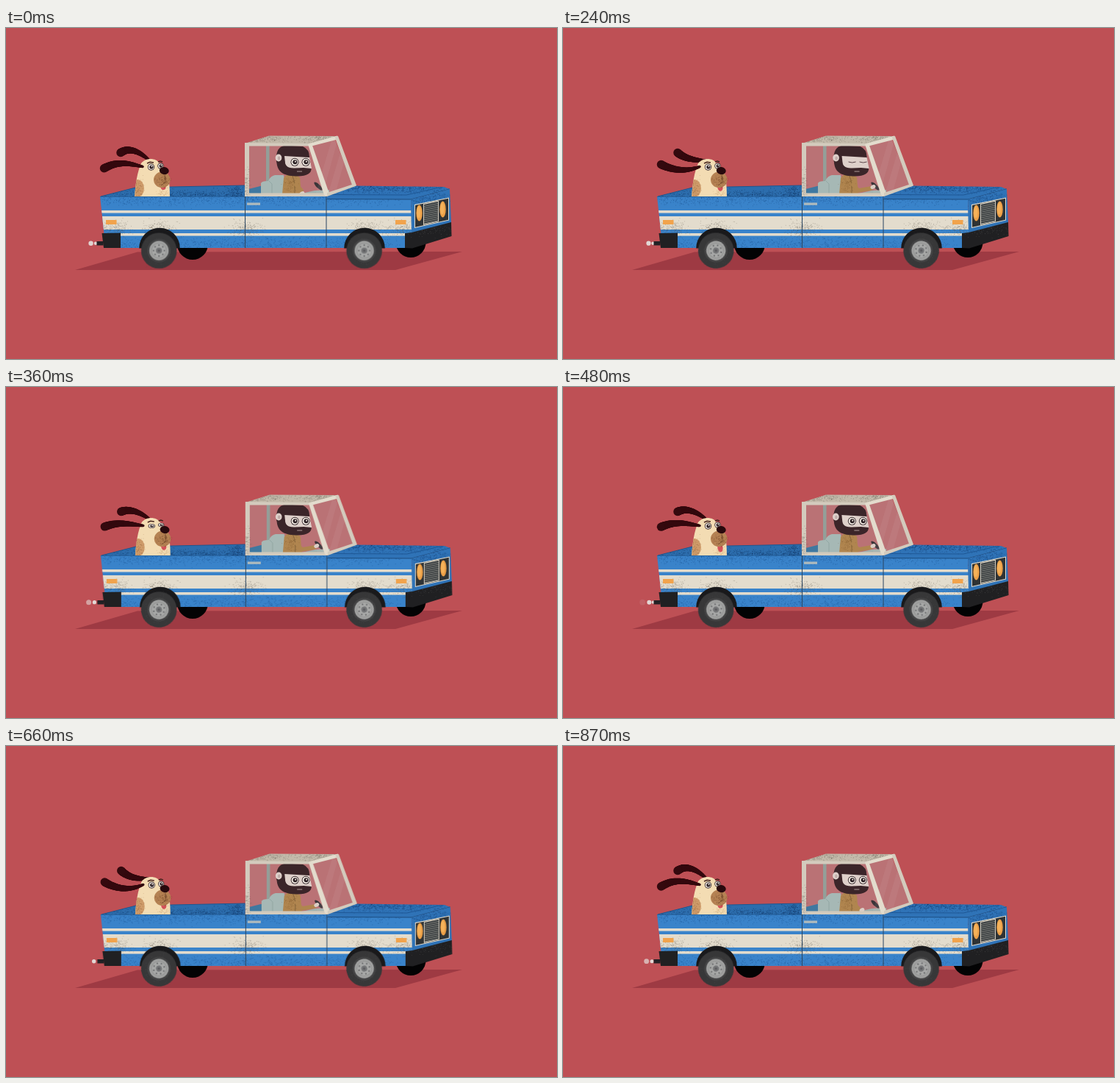
These frames come from a looping animation (750 by 450 pixels, 900 ms). An HTML page with a canvas:

```html
<!DOCTYPE html>
<html>
<head>
<meta charset="utf-8">
<title>Pickup ride</title>
<style>
html, body { margin: 0; width: 750px; height: 450px; overflow: hidden; background: #be5055; }
canvas { display: block; }
</style>
</head>
<body>
<canvas id="stage" width="750" height="450"></canvas>
<script>
const LOOP = 900, STEP = 30, TAU = Math.PI * 2;
const RED = '#be5055', BLUE = '#3983ca', CREAM = '#e3dccd', FRAME = '#d3cbbd', BLACK = '#202022', EAR = '#34090e', HAIR = '#3b2529';
const BLUE_GRAIN = 'rgba(16,58,112,.3)', DIRT = 'rgba(90,82,75,.33)';
const stage = document.getElementById('stage').getContext('2d');
let g = stage;

let seed = 7;
const random = () => (seed = seed * 16807 % 2147483647) / 2147483647;
const bell = () => random() + random() + random() - 1.5;

function trace(points) {
  g.beginPath();
  points.forEach(([x, y]) => g.lineTo(x, y));
}
function poly(color, ...points) {
  trace(points);
  g.fillStyle = color;
  g.fill();
}
function line(color, width, ...points) {
  trace(points);
  g.strokeStyle = color;
  g.lineWidth = width;
  g.stroke();
}
function rect(color, x, y, w, h) {
  g.fillStyle = color;
  g.fillRect(x, y, w, h);
}
function oval(color, x, y, rx, ry = rx, turn = 0) {
  g.beginPath();
  g.ellipse(x, y, rx, ry, turn, 0, TAU);
  g.fillStyle = color;
  g.fill();
}
function blob(color, d) {
  g.fillStyle = color;
  g.fill(new Path2D(d));
}
// Soft cloud of grain around a point.
function spray(color, x, y, sx, sy, count) {
  g.fillStyle = color;
  for (let i = 0; i < count; i++) g.fillRect(x + bell() * sx, y + bell() * sy, .9, .9);
}
function clipped(path, draw) {
  g.save();
  g.clip(path);
  draw();
  g.restore();
}
// Filled polygon whose details stay inside its outline.
function panel(color, points, details) {
  poly(color, ...points);
  clipped(new Path2D('M' + points.join('L') + 'Z'), details);
}
function layer(draw) {
  const c = document.createElement('canvas');
  c.width = 750;
  c.height = 450;
  g = c.getContext('2d');
  draw();
  g = stage;
  return c;
}

const cabin = new Path2D('M330 160L414 159L448 152L472 213L437 225L330 225Z');
const dogShape = new Path2D('M175 232C176 211 179 195 184 184C190 176 204 176 209 184L219 195Q223 205 223 232Z');

const backLayer = layer(() => {
  panel('#2c6dad', [[129, 229], [176, 217], [325, 214], [325, 231], [129, 231]], () => {
    spray('rgba(10,35,75,.35)', 230, 229, 130, 9, 1300);
    spray('rgba(10,35,75,.35)', 315, 223, 18, 14, 250);
  });
  line('#1d5690', 1, [129, 229], [176, 217], [325, 214]);
  g.fillStyle = 'rgba(176,187,188,.32)';
  g.fill(cabin);
  poly('#3f78a0', [330, 219], [350, 214], [350, 226], [330, 226]);
  rect('#939f99', 354, 159, 4.5, 52);
  blob('#a6b8b5', 'M347 226V211Q348 208 357 208Q360 201 366 200L378 200L382 226Z');
  line('#8da3a0', .8, [358, 208], [362, 212], [362, 226]);
  poly('#a3b2ae', [398, 226], [420, 221], [440, 220], [440, 226]);
});

function side() {
  panel(BLUE, [[128, 229], [436, 229], [551, 233], [553, 280], [545, 299], [135, 299], [133, 275]], () => {
    for (let x = 150; x < 550; x += 50) {
      spray(BLUE_GRAIN, x, 231, 45, 10, 190);
      spray(BLUE_GRAIN, x, 294, 40, 10, 130);
    }
    rect(CREAM, 120, 248, 440, 3.6);
    rect(CREAM, 120, 256, 440, 18);
    rect(CREAM, 120, 279, 440, 3.6);
    for (const x of [148, 209, 326, 488, 540]) spray(DIRT, x, 273, 22, 11, 240);
  });
  line('#2866a4', 1, [128, 229.5], [325, 229.5]);
  for (const x of [325.5, 436]) line('#2a4560', 1, [x, 229], [x, 299]);
  rect('#aebabd', 328, 237.5, 18, 3.3);
  for (const x of [136, 530]) rect('#f1a34c', x, 261, 14.5, 6);
}

function front() {
  panel('#2f73b7', [[437, 227], [474, 214.5], [596, 216], [604, 219], [551, 233], [436, 232]], () => {
    spray('rgba(10,40,85,.33)', 520, 217, 90, 8, 900);
    line('#1f5896', 1, [440, 226.5], [545, 227], [594, 216]);
  });
  line('#1b4d80', 1.1, [436, 232.5], [551, 233], [604, 219]);
  panel('#2f73b7', [[551, 233], [604, 219], [606, 265], [552, 279]], () =>
    spray('rgba(10,40,85,.33)', 577, 232, 35, 10, 300));
  poly(CREAM, [556, 240], [603, 230.5], [603, 261.5], [556, 272]);
  poly('#2f3335', [557, 241], [602, 231.8], [602, 260.7], [557, 270.7]);
  poly('#d5cec0', [568, 239], [589, 234.6], [589, 263.3], [568, 268]);
  poly('#3a3e40', [569, 240], [588, 236], [588, 262.4], [569, 266.6]);
  for (let y = 242.5; y < 266; y += 2.6) line('#989a93', .7, [569, y], [588, y - 4]);
  for (const [x, y] of [[562.5, 251.5], [594.5, 246.5]]) {
    oval('#eda047', x, y, 4.2, 11);
    oval('#f4b25b', x - .6, y - 1, 2.4, 8);
  }
  panel(BLACK, [[543, 279], [552, 278], [606, 264], [606.5, 283], [553, 299.5], [543, 299]], () =>
    spray('rgba(90,90,90,.4)', 575, 275, 40, 8, 120));
}

function cab() {
  clipped(cabin, () => {
    for (const x of [430, 447])
      poly('rgba(235,220,220,.07)', [x + 14, 150], [x + 22, 150], [x, 230], [x - 10, 230]);
  });
  panel('#c3baaa', [[325, 157], [358, 146.5], [451, 147], [413, 158]], () => {
    for (const x of [345, 430]) spray('rgba(85,80,68,.32)', x, 150, 40, 8, 300);
  });
  poly(FRAME, [325, 156], [413, 157], [415, 160.5], [331, 160.5], [331, 224.5], [436, 224.5], [436, 229], [325, 229]);
  spray(DIRT, 328, 215, 4, 22, 80);
  poly(CREAM, [411, 158], [416, 157], [440, 225], [437, 229], [433, 227]);
  poly(CREAM, [413, 157], [451, 146.5], [453, 151], [416, 160.5]);
  poly(FRAME, [447.5, 148], [452, 147], [477, 214], [472, 216]);
  poly(FRAME, [437, 224], [472, 212.5], [477, 214.5], [437, 229]);
}

const frontLayer = layer(() => {
  side();
  front();
  for (const x of [209, 488]) {
    g.beginPath();
    g.arc(x, 299.5, 27.8, Math.PI, TAU);
    g.fillStyle = '#19191b';
    g.fill();
  }
  poly(BLACK, [130.5, 279], [156, 278.5], [156, 299], [133, 299]);
  rect('#222125', 123.5, 290, 9, 5.5);
  cab();
});

const wheelLayer = layer(() => {
  g.translate(40, 40);
  oval('#373738', 0, 0, 24.3);
  spray('rgba(95,95,95,.3)', 0, 0, 18, 18, 200);
  oval('#434344', 0, 0, 16);
  oval('#a0a1a0', 0, 0, 13.2);
  oval('#929392', 0, 0, 10.6);
  oval('#a6a7a6', 0, 0, 9.7);
  for (let a = 0; a < TAU; a += TAU / 8) oval('#68696b', 7.4 * Math.cos(a), 7.4 * Math.sin(a), 1.1);
  oval('#747577', 0, 0, 4.1);
  oval('#59595c', 0, 0, 1.6);
});

function wheel(x, y, t) {
  g.save();
  g.translate(x, y);
  g.rotate(t / LOOP * TAU * 3);
  g.drawImage(wheelLayer, -40, -40);
  g.restore();
}

// Tapered cubic curve, thin at the root and thick at the tip.
function ear(a, b, c, d) {
  for (let i = 0; i <= 60; i++) {
    const u = i / 60, v = 1 - u;
    const at = n => v ** 3 * a[n] + 3 * v * v * u * b[n] + 3 * v * u * u * c[n] + u ** 3 * d[n];
    oval(EAR, at(0), at(1), 1.7 + 4 * u);
  }
}

function eye(x, y, r, open = 1) {
  oval('#33262a', x, y, r, r * open);
  oval('#f4ece4', x, y, r - .9, (r - .9) * open);
  oval('#2b2024', x + .4, y, r * .55, r * .55 * open);
  oval('#e9dfd8', x + .9, y - .7, r * .2);
}

function dog(t) {
  const swing = Math.cos((t + 25) / 450 * TAU);
  ear([196, 181], [185, 175 - 5 * swing], [169, 171 - 11 * swing], [156, 169.5]);
  g.fillStyle = '#f3dcb3';
  g.fill(dogShape);
  clipped(dogShape, () => {
    oval('#cf9c6a', 179, 218, 9, 12);
    spray('rgba(128,78,42,.25)', 179, 218, 9, 14, 130);
    spray('rgba(183,140,85,.3)', 214, 225, 10, 8, 80);
  });
  ear([186, 188.5], [174, 190 - 4 * swing], [155, 188 - 10 * swing], [133.5, 188 + 3 * swing]);

  const pant = .5 - .5 * Math.cos(t / 300 * TAU);
  oval('#d6545b', 214, 216 + 3 * pant, 3.6, 4 + 2 * pant, -.15);
  oval('#b58253', 212.3, 206.3, 11.3, 10.8);
  spray('rgba(85,45,25,.3)', 214, 207, 9, 9, 110);
  line('#70472d', .8, [216, 199], [217, 210], [211, 214]);
  const open = t >= 330 && t <= 390 ? .65 : 1;
  eye(197.5, 189, 4.7, open);
  eye(210.5, 187.5, 4.2, open);
  line('#43211c', 1.4, [192, 184], [196, 182.3], [201, 183]);
  line('#43211c', 1.4, [207, 182], [210, 181], [213, 182]);
  oval('#28090d', 215.3, 194, 6.5, 5, .15);
}

function driver(t) {
  const lift = Math.min(1, 2 * Math.sin(t / LOOP * Math.PI));
  const handX = 403 + 19 * lift, handY = 225 - 9 * lift;
  const sway = -.6 * Math.sin(t / 300 * TAU);
  blob('#b0854f', 'M376 226L378 204Q382 197 392 198L400 203L402 226Z');
  spray('rgba(90,55,25,.22)', 387, 214, 10, 14, 110);
  line('#7f6039', .8, [390, 201], [393, 211], [393, 226]);

  oval('#3a3438', 425, 215, 2.5, 7.5, -.8);
  g.lineCap = 'round';
  line('#b0854f', 5.5, [395, 213], [402, 221], [handX - 3, handY + 2]);
  g.lineCap = 'butt';
  oval('#dccfc6', handX, handY, 3.6, 2.7, -.5);

  g.save();
  g.translate(sway, 0);
  blob(HAIR, 'M368 181C367 168 371 160 382 159.5L404 161Q413 165 413 175L413 190L371 190Z');
  poly('#ded0ca', [379, 174], [413, 176], [416, 191], [381, 193]);
  blob(HAIR, 'M368.5 178L379 180C380 187 383 191 393 190.5L405 190L415.5 191C416 197 410 201.5 397 201.5C381 201.5 367 198 368.5 178Z');
  oval('#ded0ca', 371, 176.5, 4.3, 5);
  oval('#bfaeaa', 371.5, 177, 1.8, 2.6);
  const blink = t >= 210 && t <= 270;
  for (const x of [393, 408]) {
    if (blink) line('#594448', 1, [x - 5, 182], [x, 183], [x + 5, 182]);
    else eye(x, 182.3, 5.5);
  }
  line('#bba7a2', .9, [396, 195], [403, 195]);
  g.restore();
}

function puff(age) {
  const k = age / 600;
  if (k < 0 || k > 1) return;
  g.globalAlpha = Math.min(1, 2.4 * (1 - k));
  oval('#e2d8d5', 123 - 16 * k ** 1.5, 292.7, 2 + 2 * k);
  g.globalAlpha = 1;
}

function render(t) {
  rect(RED, 0, 0, 750, 450);
  poly('#9e3a43', [94, 329], [179, 304.5], [621, 304], [530, 329]);
  oval('#030304', 254, 294, 21);
  oval('#030304', 551, 291.5, 20.5);
  // The exhaust starts afresh late in the loop.
  const smoke = t < 555 ? t + 360 : t - 450;
  for (let n = 0; n < 4; n++) puff(smoke - n * 270);

  g.save();
  g.translate(.8 * Math.max(0, Math.sin(t / 300 * TAU)), 0);
  g.drawImage(backLayer, 0, 0);
  seed = 91;
  dog(t);
  clipped(cabin, () => driver(t));
  g.drawImage(frontLayer, 0, 0);
  g.restore();

  wheel(208.2, 302.6, t);
  wheel(487.6, 302.6, t);
}

function tick() {
  render(Math.floor(performance.now() % LOOP / STEP) * STEP);
  requestAnimationFrame(tick);
}
tick();
</script>
</body>
</html>
```
